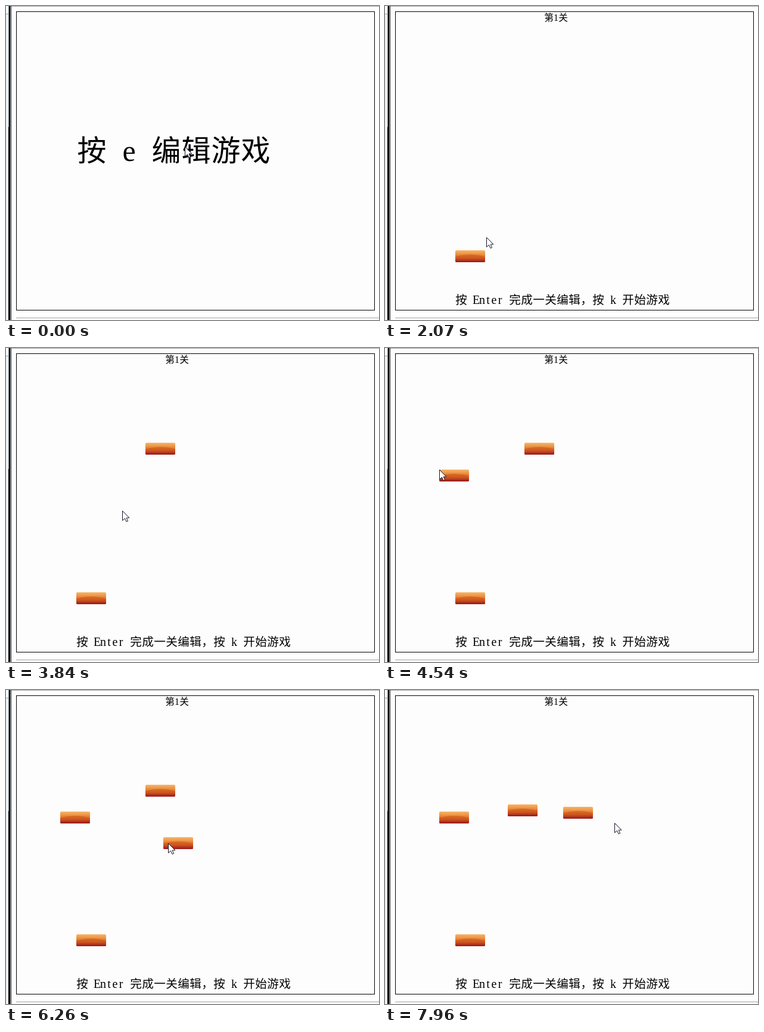
These frames come from a looping animation (626x527 px, 7990 ms). An HTML page with a canvas:

```html
<!DOCTYPE html>
<html lang="zh">
<head>
<meta charset="utf-8">
<style>
  html, body { margin: 0; width: 100%; height: 100%; overflow: hidden; background: #fff; }
  canvas { display: block; }
</style>
</head>
<body>
<canvas id="stage" width="626" height="527"></canvas>
<script>
const ctx = document.getElementById('stage').getContext('2d');
const LOOP = 7990, EDITOR_AT = 1380;

// Pointer path as { t, x, y }; it rests between moves
const path = [{ t: 0, x: 300, y: 236 }];

// Visits the points at equal intervals between start and end
function move(start, end, ...points) {
  const last = path[path.length - 1];
  if (start > last.t) path.push({ ...last, t: start });
  points.forEach(([x, y], i) =>
    path.push({ t: start + (end - start) * (i + 1) / points.length, x, y }));
}

move(30, 110, [298, 237]);
move(300, 1090, [268, 302], [179, 268], [200, 228], [258, 211]);
move(1120, 1230, [247, 208]);
move(1380, 1530, [244, 210]);
move(1900, 2220, [173, 382], [136, 436]);
move(2380, 3170, [209, 310], [190, 219], [142, 424]);
move(3230, 3300, [142, 427]);
move(3370, 3640, [234, 159]);
move(3710, 4000, [142, 425]);
move(4060, 4480, [91, 204]);
move(4600, 4820, [155, 423]);
move(4940, 5240, [331, 228]);
move(5410, 5550, [341, 232]);
move(5700, 6225, [586, 160], [420, 75], [230, 170], [274, 251]);
move(6225, 6260, [272, 257]);
move(6260, 6675, [314, 150], [277, 185]);
move(6675, 6745, [247, 188], [216, 196]);
move(6745, 7290, [270, 2], [316, 10]);
move(7320, 7700, [242, 165], [250, 170]);
move(7870, 7925, [315, 207]);
move(7925, 7960, [385, 223]);
move(LOOP, LOOP);

const clamp = (v, lo, hi) => Math.min(hi, Math.max(lo, v));
const slope = (i, axis) => (path[i + 1][axis] - path[i][axis]) / (path[i + 1].t - path[i].t);

// Harmonic mean of neighbouring slopes: smooth, without overshoot
function tangent(i, axis) {
  if (i === 0 || i === path.length - 1) return 0;
  const a = slope(i - 1, axis), b = slope(i, axis);
  return a * b > 0 ? 2 * a * b / (a + b) : 0;
}

function pointer(t) {
  const i = path.findIndex(p => p.t > t) - 1;
  const from = path[i], to = path[i + 1], span = to.t - from.t, u = (t - from.t) / span;
  const ease = u * u * (3 - 2 * u);
  return ['x', 'y'].map(axis => from[axis] + (to[axis] - from[axis]) * ease
    + span * (u * (1 - u) ** 2 * tangent(i, axis) - u * u * (1 - u) * tangent(i + 1, axis)));
}

function dragged(t, start, end, lag = 0, dx = 0, dy = 0) {
  const [x, y] = pointer(clamp(t - lag, start, end));
  return [x - dx, y - dy];
}

function bricks(t) {
  const list = [[118, 410]];
  if (t > 3370) list.push(t < 7905 ? dragged(t, 3370, 3640) : dragged(t, 7870, 7925, 35, 16, 11));
  if (t >= 4090) list.push(dragged(t, 4090, 4480));
  if (t > 4940) list.push(t < 5700 ? dragged(t, 4940, 5240) : dragged(t, 5700, 6745, 35, 10, 4));
  return list;
}

function rect(color, x, y, w, h) {
  ctx.fillStyle = color;
  ctx.fillRect(x, y, w, h);
}

function gradient(y0, y1, ...colors) {
  const g = ctx.createLinearGradient(0, y0, 0, y1);
  colors.forEach((c, i) => g.addColorStop(i / (colors.length - 1), c));
  return g;
}

function drawBrick([x, y]) {
  ctx.save();
  ctx.translate(Math.round(x), Math.round(y));
  ctx.beginPath();
  ctx.roundRect(0, 0, 50, 20, 2);
  ctx.clip();
  rect(gradient(0, 20, '#f8b66c', '#ea9040', '#d5541c', '#981a1c'), 0, 0, 50, 20);
  ctx.beginPath();
  ctx.ellipse(25, 16, 29, 9, 0, 0, 7);
  ctx.fillStyle = gradient(7, 20, '#dc6e20', '#cc5420', '#94161c');
  ctx.fill();
  ctx.restore();
}

const arrow = new Path2D('M0 0V16L4 12.5 6.5 18 9 17 6.7 11.5H11.5Z');

function drawPointer([x, y]) {
  ctx.save();
  ctx.translate(Math.round(x) + .5, Math.round(y) + .5);
  ctx.fillStyle = '#fff';
  ctx.fill(arrow);
  ctx.strokeStyle = '#141428';
  ctx.stroke(arrow);
  ctx.restore();
}

// Han characters take a full cell, Latin characters half a cell
function drawText(text, x, y, size) {
  ctx.fillStyle = '#000';
  ctx.textAlign = 'center';
  for (const ch of text) {
    const latin = ch < '\x7f', cell = latin ? size / 2 : size;
    ctx.font = latin ? `${size}px "Liberation Serif", serif`
      : `300 ${size * .98}px "Noto Sans CJK SC", "Noto Sans CJK", sans-serif`;
    ctx.fillText(ch, x + cell / 2, y);
    x += cell;
  }
}

function drawPage() {
  rect('#fff', 0, 0, 626, 527);
  rect('#f0f0f0', 0, 14, 4, 513);
  rect('#a0a0a0', 0, 13, 4, 1);
  rect('#7c8a90', 4, 0, 1, 527);
  rect('#000', 5, 0, 2, 527);
  rect('#b4bcc0', 7, 0, 1, 527);
  rect('#202428', 8, 0, 1, 527);
  rect('#000', 4, 203, 3, 324);
  rect('#a0a0a0', 9, 0, 617, 1);
  rect('#a0a0a0', 17, 523, 609, 1);
  rect('#000', 17, 9, 602, 502);
  rect('#fdfdfd', 18, 10, 600, 500);
}

function draw(t) {
  drawPage();
  if (t < EDITOR_AT) {
    drawText('按 e 编辑游戏', 119, 260, 50);
  } else {
    drawText('第1关', 267, 25, 16);
    drawText('按 Enter 完成一关编辑，按 k 开始游戏', 118, 500, 20);
    bricks(t).forEach(drawBrick);
  }
  drawPointer(pointer(t));
}

function tick() {
  draw(performance.now() % LOOP);
  requestAnimationFrame(tick);
}
tick();
</script>
</body>
</html>
```
